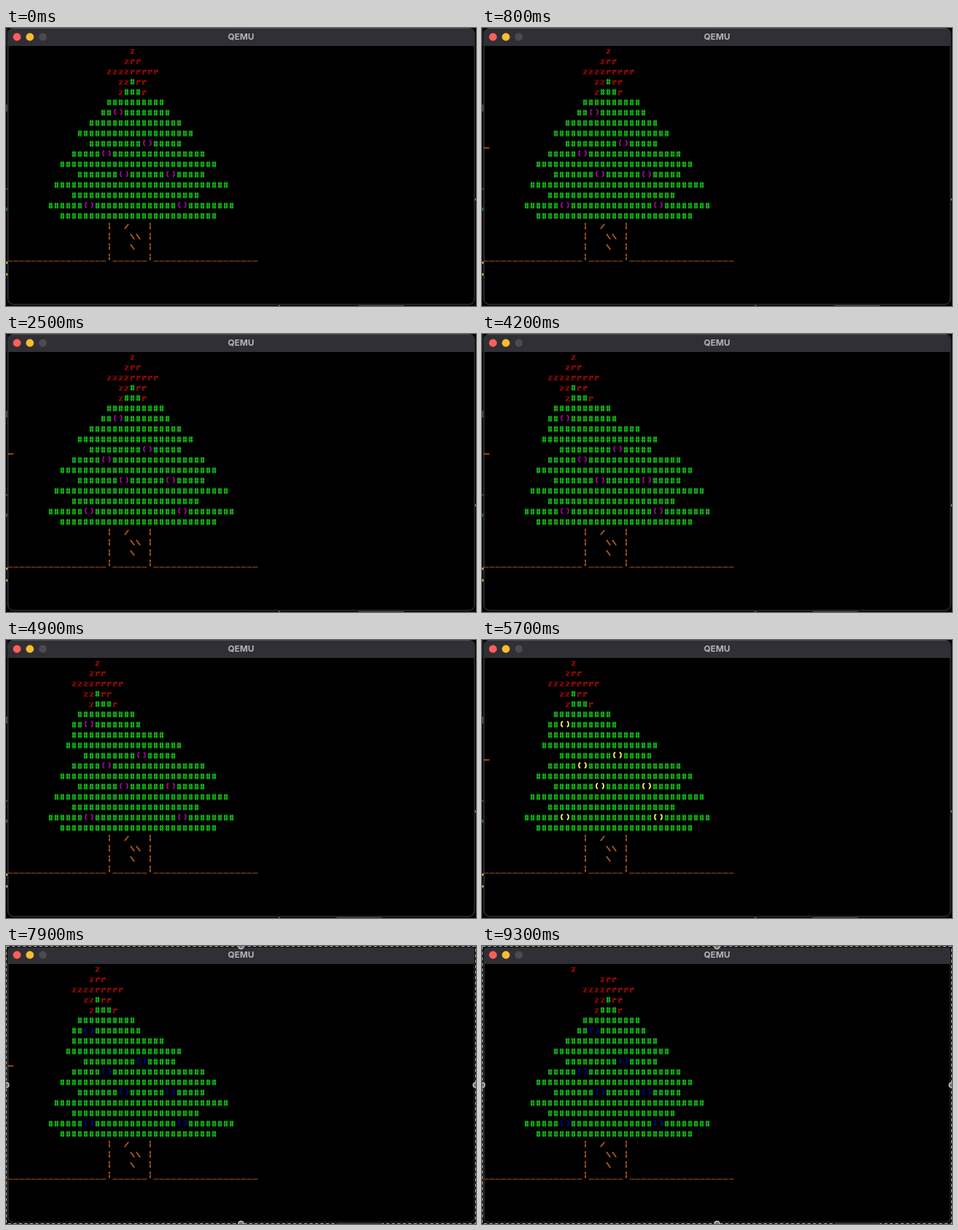
Recreate the animation shown at these times as an HTML page with a canvas. Size 600x356 px, loop 9.4 s.

```html
<!DOCTYPE html>
<html lang="en">
<head>
<meta charset="utf-8">
<title>Swaying tree</title>
<style>
html, body { margin: 0; width: 100%; height: 100%; overflow: hidden; background: #000; }
canvas { display: block; }
</style>
</head>
<body>
<canvas id="stage" width="600" height="356"></canvas>
<script>
const ctx = document.getElementById('stage').getContext('2d');
const LOOP = 9400, CELL_W = 7.45, CELL_H = 13.22, LEFT = 2, TOP = 23;
const BROWN = '#b05a18';
const INK = { '#': '#14ba18', z: '#a80a0a', r: '#a80a0a' };
const BULBS = ['#0000a0', '#ffff66', '#a800a8'];

// Console letters on a 9 by 16 cell: thick strokes, then thin ones
const GLYPHS = {
  '#': ['M2 3V12M5 3V12', 'M0 5.5H7M0 9.5H7'],
  z: ['M5.5 6.5L1.5 11', 'M0 5.5H7M0 11.5H7'],
  r: ['M2 6V11M3 7L4.5 6H6V8', 'M0 5.5H2M0 11.5H4'],
  '(': ['M5 2L3 4.5V8.5L5 11'],
  ')': ['M3 2L5 4.5V8.5L3 11'],
  '/': ['M6.5 4L.5 11.5'],
  '\\': ['M.5 3.5L6.5 11.5'],
  '|': ['M4 2V6M4 7V12'],
  _: ['', 'M0 13.5H8'],
  cursor: ['M0 14H9']
};
for (const key in GLYPHS) GLYPHS[key] = GLYPHS[key].map(d => new Path2D(d));

// Each row: first column, text, columns it leans to the left
const tree = [
  [21, 'z', 6],
  [20, 'zrr', 6],
  [17, 'zzzzrrrrr', 6],
  [19, 'zz#rr', 6],
  [19, 'z###r', 5],
  [17, hashes(10), 5],
  [16, hashes(2, 8), 5],
  [14, hashes(16), 3],
  [12, hashes(20), 2],
  [14, hashes(9, 5), 1],
  [11, hashes(5, 16), 0],
  [9, hashes(27), 0],
  [12, hashes(7, 6, 5), 0],
  [8, hashes(30), 0],
  [11, hashes(22), 0],
  [7, hashes(6, 14, 8), 0],
  [9, hashes(27), 0]
];
const trunk = [
  [17, 17, '|  /   |'],
  [17, 18, '|   \\\\ |'],
  [17, 19, '|   \\  |'],
  [0, 20, '_'.repeat(17) + '|______|' + '_'.repeat(18)]
];

// Start time and x of the sliver showing below the window
const sliver = [[0, 450], [200, 422], [600, 450], [1100, 480], [1900, 450], [2700, 480],
  [3200, 450], [3800, 422], [6100, 450], [6700, 480], [7300, 422], [8400, 480], [8700, 450]];

function hashes(...runs) {
  return runs.map(n => '#'.repeat(n)).join('()');
}

function mod(a, b) {
  return ((a % b) + b) % b;
}

function rect(x, y, w, h, color) {
  ctx.fillStyle = color;
  ctx.fillRect(x, y, w, h);
}

function disc(x, y, r, color) {
  ctx.fillStyle = color;
  ctx.beginPath();
  ctx.arc(x, y, r, 0, 7);
  ctx.fill();
}

function glyph(name, col, row, color) {
  if (!GLYPHS[name]) return;
  ctx.save();
  ctx.translate(LEFT + col * CELL_W, TOP + row * CELL_H);
  ctx.scale(CELL_W / 9, CELL_H / 16);
  ctx.strokeStyle = color;
  GLYPHS[name].forEach((path, i) => {
    ctx.lineWidth = 2 - i;
    ctx.stroke(path);
  });
  ctx.restore();
}

function print(col, row, text, colorOf) {
  [...text].forEach((ch, i) => glyph(ch, col + i, row, colorOf(ch)));
}

function drawBackdrop() {
  rect(0, 0, 600, 356, '#050506');
  rect(0, 0, 2, 23, '#1c1c1e');
  rect(0, 98, 1.5, 9, '#555');
  rect(0, 205, 1.5, 2, '#555');
  rect(0, 230, 1.5, 4, '#18805c');
  rect(0, 299, 2, 3, '#a8a030');
  rect(0, 314, 2, 3, '#a8a030');
  rect(598.5, 218, 1.5, 3, '#777');
  rect(348, 355, 2, 1, '#777');
}

function drawWindow() {
  ctx.fillStyle = '#000';
  ctx.strokeStyle = '#434346';
  ctx.lineWidth = 1;
  ctx.beginPath();
  ctx.roundRect(2.5, 0.5, 595.5, 353.5, 7);
  ctx.fill();
  ctx.stroke();
  ctx.fillStyle = '#302f35';
  ctx.beginPath();
  ctx.roundRect(2, 0, 596.5, 23, [7, 7, 0, 0]);
  ctx.fill();
  rect(8, 0, 584, 1, '#4c4b51');
  disc(14, 11.5, 5, '#ff5f57');
  disc(30.5, 11.5, 5, '#febc2e');
  disc(47, 11.5, 5, '#4b4a50');
  ctx.font = 'bold 11px Inter, sans-serif';
  ctx.textAlign = 'center';
  ctx.fillStyle = '#b5b4b8';
  ctx.fillText('QEMU', 300, 15.3);
}

function drawTree(t) {
  const bulb = BULBS[Math.floor(mod(t - 225, 823.8) / 274.6)];
  tree.forEach(([col, text, lean], row) => {
    // The sway runs down from the top, row by row
    const leaning = mod(t - 296 - row * 6, 750) < 375;
    print(leaning ? col - lean : col, row, text, ch => INK[ch] || bulb);
  });
  for (const [col, row, text] of trunk) print(col, row, text, () => BROWN);
}

function drawSelection() {
  ctx.lineWidth = 2;
  ctx.strokeStyle = '#111';
  ctx.strokeRect(1, 1, 598, 354);
  ctx.strokeStyle = '#aaa';
  ctx.lineWidth = 1;
  ctx.setLineDash([4, 3]);
  ctx.strokeRect(0.5, 0.5, 599, 355);
  ctx.setLineDash([]);
  for (const [x, y] of [[300, 0.5], [0.5, 178], [599.5, 178], [300, 355.5]]) {
    disc(x, y, 3.8, '#ccc');
    disc(x, y, 2.6, '#777');
  }
}

function draw(t) {
  drawBackdrop();
  drawWindow();
  drawTree(t);
  if (mod(t - 250, 1600 / 3) < 800 / 3) glyph('cursor', 0, 9, BROWN);
  if (t >= 7700) drawSelection();
  rect(sliver.filter(s => s[0] <= t).pop()[1], 355, 58, 1, '#4a4a4a');
}

const begin = performance.now();
function tick() {
  // The picture advances ten times a second
  draw(Math.floor((performance.now() - begin) % LOOP / 100) * 100);
  requestAnimationFrame(tick);
}
tick();
</script>
</body>
</html>
```
